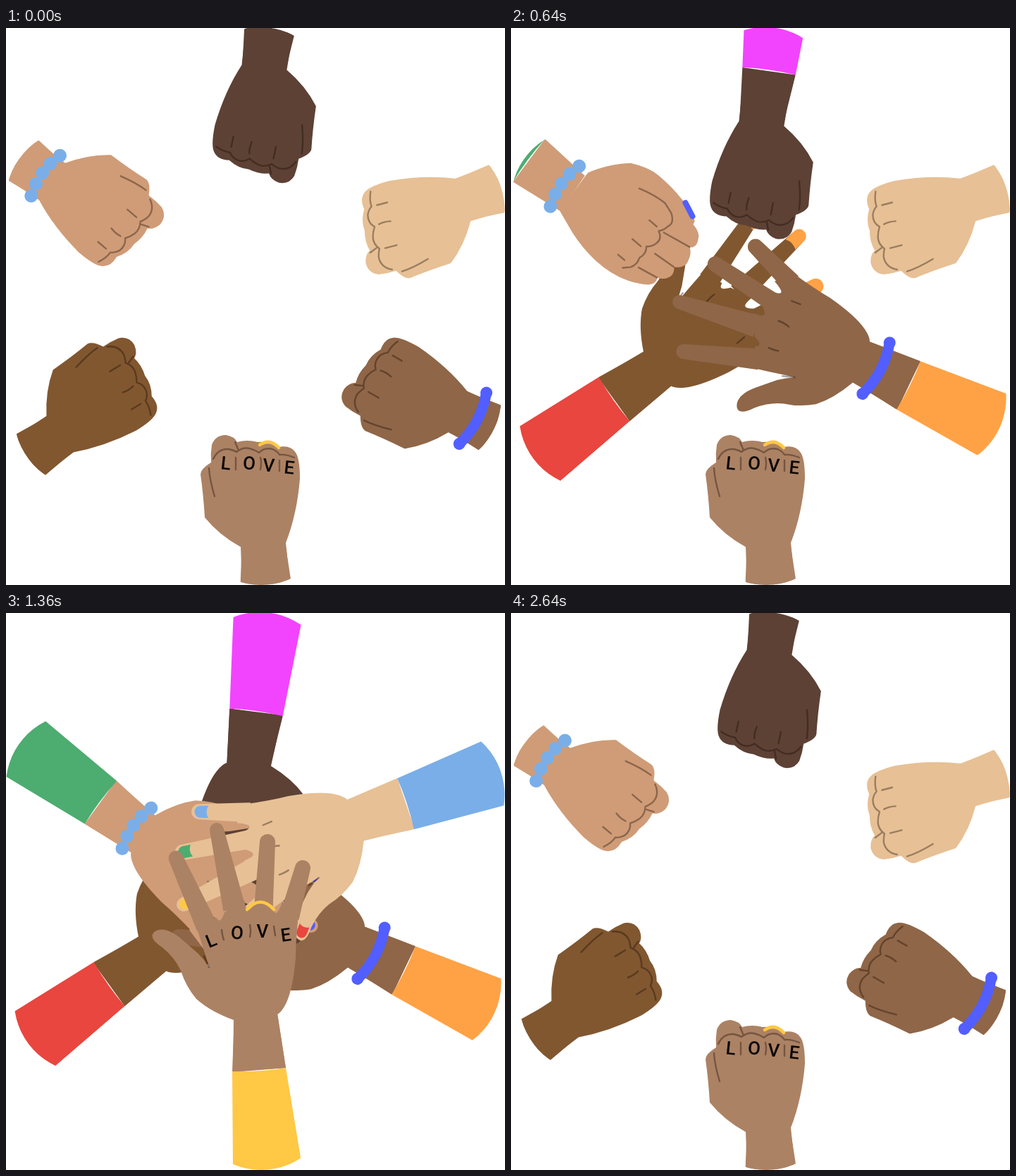
Animation of 708 by 791 pixels, one loop 2.72 s. Source, as an HTML page with a canvas:

```html
<!DOCTYPE html>
<html lang="en">
<head>
<meta charset="utf-8">
<title>Hands together</title>
<style>
html, body { margin: 0; width: 100%; height: 100%; overflow: hidden; background: #fff; }
canvas { display: block; }
</style>
</head>
<body>
<canvas id="stage" width="708" height="791"></canvas>
<script>
const ctx = document.getElementById('stage').getContext('2d');
const STEP = 80, STEPS = 34, BACK = 26;
const CUFF = { x: 359, y: 648.5 };          // cuff centre in hand space
const PULL = { x: 10.7, y: 160.6 };         // how far an arm is drawn back at rest

// Hand space is the upright hand of the lowest arm, fully reached in.
const wrist = new Path2D('M321,651 L324,574 L385,568 L397,646Z');
const sleeve = new Path2D('M321,651 Q362,652 397,646 L430,846 L322.5,860Z');

// p: reach at which the drawing's coordinates were laid out
const fist = {
  p: 0,
  body: new Path2D('M335,790 L333,737 Q302,720 282,695 Q280,662 276,634 Q276,626 291,617 Q290,604 292,592 Q297,578 312,578 Q324,580 328,588 Q342,584 357,588 Q372,586 387,595 Q404,592 411,603 Q417,612 417,640 Q413,690 397,731 L403,790Z'),
  lines: new Path2D('M294,612 Q301,597 316,598 Q324,600 327,602 Q336,595 345,597 Q353,599 359,603 Q367,595 378,598 Q385,601 388,606 Q397,605 409,610 M325,588 L330,600 M288,625 Q289,642 296,665 M326,610 V627 M361,610 Q363,618 361,627 M388,614 V629'),
  band: new Path2D('M360,592 Q374,582 387,596'),
  word: [[312, 618, 6], [345, 618, 4], [373, 621, 3], [402, 624, 6]]
};

const claw = {
  p: 0.156,
  body: new Path2D('M327,709 Q316,704 302,694 Q284,680 277,671 Q265,648 265,630 Q265,605 269,585 Q272,562 279,552 Q281,548 286,548 Q289,532 297,529 Q308,522 314,530 Q320,522 329,520 Q340,515 350,529 Q355,524 361,524 Q371,525 377,537 Q385,533 393,541 Q402,554 407,567 Q416,590 415,620 Q414,645 406,671 L394,705Z'),
  lines: new Path2D('M314,531 L322,572 M350,530 L353,562 M377,538 L383,567 M294,582 Q302,569 311,573 Q320,574 325,579 Q330,568 340,570 Q348,571 353,578 Q361,571 372,575 Q381,571 390,576 L398,584 M294,582 L289,598 Q290,618 297,639 M322,585 V599 M358,584 V600 M388,589 V601'),
  band: new Path2D('M353,538 Q366,529 379,543'),
  word: [[305, 597, -2], [341, 595, 3], [373, 597, 2], [400, 600, 2]],
  thumb: [278, 556, 270, 576]
};

// fingers: tip x, y, root x, y, tip radius, root radius (index to little)
const bent = {
  p: 1,
  body: new Path2D('M322,652 L323,575 Q292,562 274,544 Q262,530 256,512 Q250,490 237,470 Q228,458 221,451 Q217,442 222,436 Q232,431 240,440 Q256,454 270,472 Q280,485 288,504 L283,482 Q276,460 271,448 L298,430 Q304,441 311,425 L340,410 Q344,430 354,412 L379,412 Q385,440 391,414 L411,422 Q415,455 411,490 Q408,535 396,557 Q391,567 385,570 L397,646Z'),
  lines: new Path2D('M306,451 L310,463 M346,448 V461 M379,451 L381,461 M261,389 Q266,388 271,385 M307,367 L319,364 M353,373 H363 M390,365 L399,364 M283,448 Q288,443 294,444 M321,437 L332,435 M357,436 Q363,434 369,436 M385,440 Q392,436 399,437 M284,494 L289,505 M407,488 H413'),
  band: new Path2D('M344,424 Q361,402 378,424'),
  word: [[295, 460, -13], [329, 455, 3], [363, 457, 2], [392, 459, -6]],
  thumb: [229, 442, 245, 460, 9],
  fingers: [[265, 350, 286, 442, 10.5, 15], [303, 322, 326, 421, 10, 15.5], [349, 342, 366, 422, 10, 14], [390, 367, 399, 430, 9, 13]],
  nail: 6
};

const open = {
  p: 1,
  body: new Path2D('M322,652 L323,578 Q290,566 270,548 Q255,530 248,508 Q240,490 222,475 Q205,464 208,456 Q213,448 226,450 Q238,453 250,464 L272,483 Q281,492 288,503 L284,489 Q276,465 271,448 L298,432 Q304,444 310,425 L338,407 Q341,434 354,410 L377,410 Q381,442 392,410 L415,428 Q411,465 411,490 Q407,535 397,555 Q391,567 385,570 L397,646Z'),
  lines: new Path2D('M306,450 Q307,459 309,464 M346,443 Q348,452 346,460 M380,445 L382,458 M281,487 L288,503'),
  band: new Path2D('M342,421 Q361,400 380,421'),
  word: [[291, 465, -22], [328, 454, 3], [364, 452, 0], [397, 457, -8]],
  thumb: [217, 459, 244, 479, 9.5],
  fingers: [[241, 348, 285, 446, 10.5, 15], [299, 308, 324, 420, 10, 16], [371, 325, 365, 425, 11, 13.5], [421, 362, 402, 432, 11, 14]],
  nail: 13
};

const half = { ...bent, nail: 4, fingers: bent.fingers.map(([x, y, bx, by, r, br]) =>
  [x + (bx - x) * .45, y + (by - y) * .45, bx, by, r + 1, br]) };

// x, y: cuff centre when reached in; start: first moving step. Painted in order.
const arms = [
  { x: 146.5, y: 527, turn: 58.6, start: 1, skin: '#815730', cloth: '#e8463e', nails: Array(5).fill('#ffa245'), long: true },
  { x: 564, y: 507.5, turn: -60, start: 5, skin: '#8f6647', cloth: '#ffa245', extra: cord },
  { x: 355, y: 141, turn: 191.7, start: 7, lag: 2, skin: '#5d4135', cloth: '#f244ff' },
  { x: 134.5, y: 269, turn: 130.4, start: 8, skin: '#cf9c77', cloth: '#4dac70', nails: Array(5).fill('#525eff'), extra: beads },
  { x: 567, y: 271, turn: -104.4, start: 10, skin: '#e7c095', cloth: '#7aaee8', nails: ['#e8463e', '#ffa245', '#ffc845', '#4dac70', '#7aaee8'] },
  { x: 359, y: 648.5, turn: 0, start: 14, skin: '#ac8264', cloth: '#ffc845', tattoo: true }
];

const clamp = v => Math.max(0, Math.min(1, v));
const smooth = v => { v = clamp(v); return v * v * (3 - 2 * v); };

function reach(arm, n, lag = 0) {
  if (n > BACK) return 1 - smooth((n - BACK) / 7);
  return smooth((n - lag - arm.start + 1) / 4);
}

function poseFor(p) {
  return p > .99 ? open : p > .7 ? bent : p > .35 ? half : p > .1 ? claw : fist;
}

function stroke(path, color, width) {
  ctx.strokeStyle = color;
  ctx.lineWidth = width;
  ctx.stroke(path);
}

function dot(x, y, r) {
  ctx.beginPath();
  ctx.arc(x, y, r, 0, 2 * Math.PI);
  ctx.fill();
}

function beads() {
  ctx.fillStyle = '#7aaee8';
  for (let i = 0; i < 5; i++) dot(319 + 17.5 * i, 589 - 1.5 * i + 1.5 * i * (4 - i), 9.5);
}

function cord() {
  stroke(new Path2D('M316,598 Q357,610 398,595'), '#525eff', 15);
  ctx.fillStyle = '#525eff';
  dot(316, 598, 8.5);
  dot(398, 595, 8.5);
}

// run draw in a frame at the fingertip, x axis pointing outwards
function atTip([x, y, bx, by], draw) {
  ctx.save();
  ctx.translate(x, y);
  ctx.rotate(Math.atan2(y - by, x - bx));
  ctx.beginPath();
  draw(Math.hypot(x - bx, y - by));
  ctx.fill();
  ctx.restore();
}

function finger(f) {
  atTip(f, len => {
    ctx.arc(0, 0, f[4], -Math.PI / 2, Math.PI / 2);
    ctx.lineTo(-len, f[5]);
    ctx.lineTo(-len, -f[5]);
  });
}

function nail(f, len, color, long) {
  const w = long ? f[4] : f[4] * .78, out = long ? 4 : -2;
  ctx.fillStyle = color;
  atTip(f, () => {
    ctx.arc(out, 0, w, -Math.PI / 2, Math.PI / 2);
    ctx.lineTo(-len, w);
    ctx.quadraticCurveTo(5 - len, 0, -len, -w);
  });
}

function paintNails(arm, pose) {
  const tips = pose.fingers;
  if (tips) {
    [pose.thumb, ...tips].forEach((f, i) => nail(f, pose.nail, arm.nails[i], arm.long));
  } else if (pose.thumb) {
    const [x, y, bx, by] = pose.thumb;
    stroke(new Path2D(`M${x},${y} L${bx},${by}`), arm.nails[0], 8);
  }
}

function paintTattoo(pose) {
  stroke(pose.band, '#ffc845', 4.5);
  ctx.fillStyle = '#0b0705';
  pose.word.forEach(([x, y, deg], i) => {
    ctx.save();
    ctx.translate(x, y);
    ctx.rotate(deg * Math.PI / 180);
    ctx.fillText('LOVE'[i], 0, 9);
    ctx.restore();
  });
}

function paintArm(arm, n) {
  const p = reach(arm, n), pose = poseFor(reach(arm, n, arm.lag));
  ctx.save();
  ctx.translate(arm.x, arm.y);
  ctx.rotate(arm.turn * Math.PI / 180);
  ctx.translate(-CUFF.x, -CUFF.y);

  // fixed rounded edge that the arm slides out from
  ctx.beginPath();
  ctx.rect(-200, -200, 1200, 889);
  ctx.arc(362, 689, 102, 0, Math.PI);
  ctx.clip();

  ctx.translate(PULL.x * (1 - p), PULL.y * (1 - p));
  ctx.fillStyle = arm.skin;
  ctx.fill(wrist);

  ctx.save();
  ctx.translate(-PULL.x * (1 - pose.p), -PULL.y * (1 - pose.p));
  ctx.fill(pose.body);
  (pose.fingers || []).forEach(finger);
  stroke(pose.lines, 'rgba(20,8,0,.36)', 2.4);
  if (arm.nails) paintNails(arm, pose);
  if (arm.tattoo) paintTattoo(pose);
  ctx.restore();

  ctx.fillStyle = arm.cloth;
  ctx.fill(sleeve);
  if (arm.extra) arm.extra();
  ctx.restore();
}

function frame(now) {
  const n = Math.floor(now / STEP) % STEPS;
  ctx.fillStyle = '#fff';
  ctx.fillRect(0, 0, 708, 791);
  ctx.lineCap = ctx.lineJoin = 'round';
  ctx.font = "500 26px Roboto, sans-serif";
  ctx.textAlign = 'center';
  arms.forEach(arm => paintArm(arm, n));
}

const begin = performance.now();
function tick() {
  frame(performance.now() - begin);
  requestAnimationFrame(tick);
}
tick();
</script>
</body>
</html>
```
